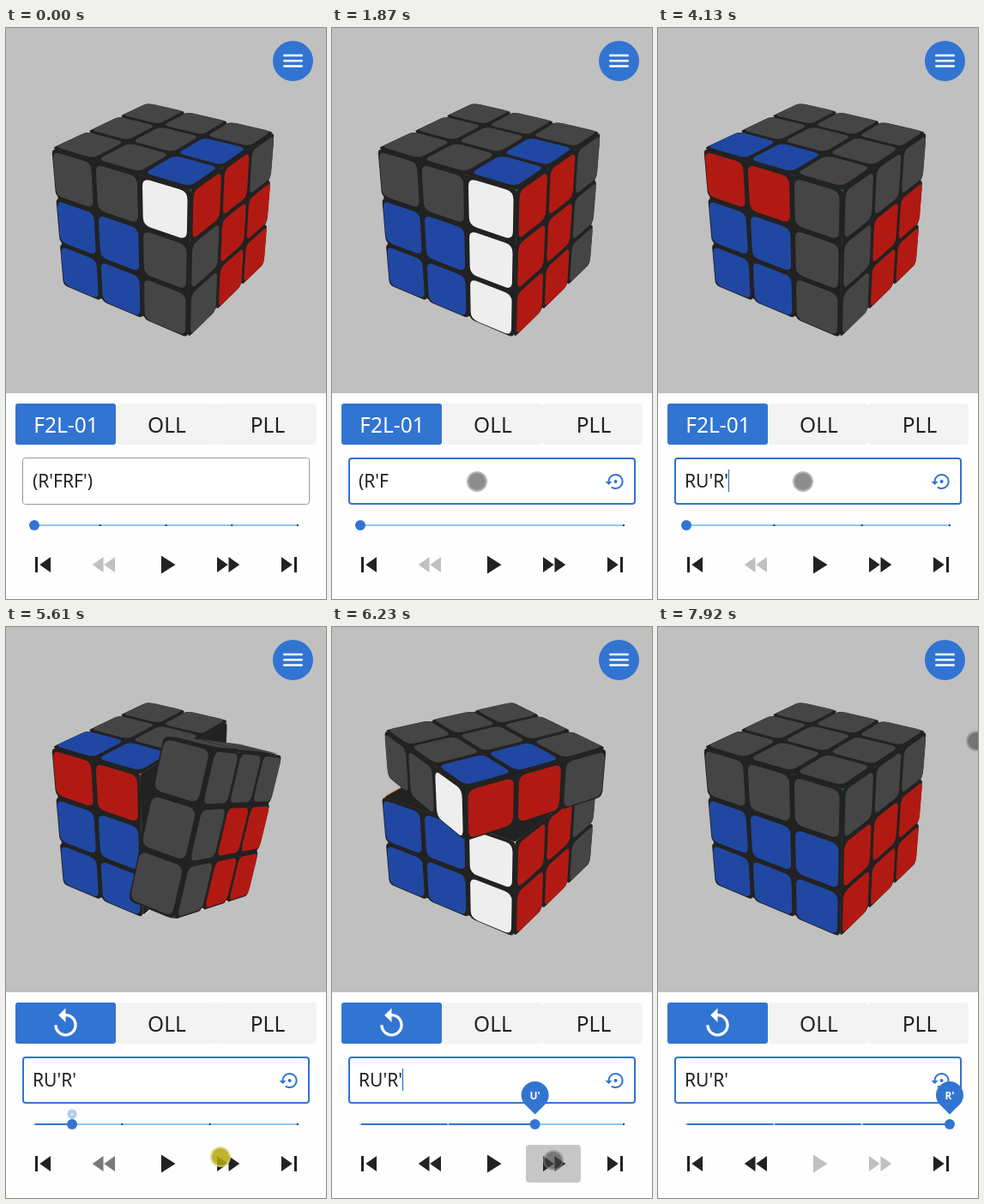
An HTML page with a canvas for the animation above (8 s loop, 373 by 666 pixels).

```html
<!DOCTYPE html>
<html lang="en">
<head>
<meta charset="utf-8">
<title>Cube trainer</title>
<style>
  html, body { margin: 0; width: 100%; height: 100%; overflow: hidden; background: #fff; }
  canvas, svg { position: absolute; left: 0; top: 0; display: block; }
  svg { font-family: "Noto Sans", "Open Sans", sans-serif; }
  .tab { font-size: 24.5px; text-anchor: middle; fill: #222; }
  .blue { fill: #3274d2; }
  .icon { fill: #222; }
</style>
</head>
<body>
<canvas id="view" width="373" height="426"></canvas>
<svg width="373" height="666" viewBox="0 0 373 666">
  <circle class="blue" cx="334.5" cy="38.5" r="23.5"/>
  <path d="M323.3 32h22.4M323.3 38.2h22.4M323.3 44.4h22.4" stroke="#fff" stroke-width="2.5"/>
  <rect y="426" width="373" height="240" fill="#fefefe"/>

  <rect x="11" y="438" width="117" height="48" rx="4" fill="#f3f3f3"/>
  <rect x="128" y="438" width="117" height="48" rx="4" fill="#f3f3f3"/>
  <rect x="245" y="438" width="117" height="48" rx="4" fill="#f3f3f3"/>
  <rect class="blue" x="11" y="438" width="117" height="48" rx="3"/>
  <text id="caseName" class="tab" x="70" y="472" style="fill:#fff;font-weight:500">F2L-01</text>
  <path id="replay" fill="#fff" transform="translate(49.7 442.8) scale(1.65)" d="M12 5V1L7 6l5 5V7c3.31 0 6 2.69 6 6s-2.69 6-6 6-6-2.69-6-6H4c0 4.42 3.58 8 8 8s8-3.58 8-8-3.58-8-8-8z"/>
  <text class="tab" x="187.5" y="472">OLL</text>
  <text class="tab" x="305" y="472">PLL</text>

  <rect id="box" x="19.5" y="501.5" width="334" height="54" rx="3" fill="#fff" stroke="#999"/>
  <text id="entry" x="31" y="536" font-size="21" fill="#222"></text>
  <path id="caret" d="M0 515v26" stroke="#3274d2" stroke-width="1.3"/>
  <path id="restore" class="blue" transform="translate(318.6 517)" d="M14 12c0-1.1-.9-2-2-2s-2 .9-2 2 .9 2 2 2 2-.9 2-2zm-2-9c-4.97 0-9 4.03-9 9H0l4 4 4-4H5c0-3.87 3.13-7 7-7s7 3.13 7 7-3.13 7-7 7c-1.51 0-2.91-.49-4.06-1.3l-1.42 1.44C8.04 20.3 9.94 21 12 21c4.97 0 9-4.03 9-9s-4.03-9-9-9z"/>

  <path d="M33 580H340" stroke="#90c6f5" stroke-width="2"/>
  <path id="filled" stroke="#3274d2" stroke-width="2"/>
  <path id="ticks" stroke="#24405e" stroke-width="2"/>
  <path id="passed" stroke="#b4d2f2" stroke-width="2"/>
  <g id="thumb">
    <circle class="blue" r="6"/>
    <g id="pin">
      <path class="blue" d="M0-11.4L-11.3-22.7A16 16 0 1 1 11.3-22.7Z"/>
      <text id="move" y="-29.5" font-size="12" font-weight="600" fill="#fff" text-anchor="middle"></text>
    </g>
  </g>

  <rect id="press" x="226" y="604" width="64" height="44" rx="4" fill="#c6c6c6"/>
  <g class="icon">
    <path transform="translate(25 608) scale(1.5)" d="M6 6h2v12H6zm3.5 6l8.5 6V6z"/>
    <path id="rewind" transform="translate(97 608) scale(1.5)" d="M11 18V6l-8.5 6 8.5 6zm.5-6l8.5 6V6l-8.5 6z"/>
    <path id="play" transform="translate(169 608) scale(1.5)" d="M8 5v14l11-7z"/>
    <path id="forward" transform="translate(240 608) scale(1.5)" d="M4 18l8.5-6L4 6v12zm9-12v12l8.5-6L13 6z"/>
    <path transform="translate(312 608) scale(1.5)" d="M6 18l8.5-6L6 6v12zM16 6v12h2V6h-2z"/>
  </g>
  <circle id="pointer" r="11" stroke-width="2"/>
</svg>
<script>
const $ = id => document.getElementById(id);
const ctx = $('view').getContext('2d');
const LOOP = 8000;

// [time, text, moves understood so far]
const typing = [
  [0, "(R'FRF')", "R' F R F'"],
  [1330, "(R'FRF'", "R'"], [1480, "(R'FRF", "R'"], [1620, "(R'FR", "R'"],
  [1790, "(R'F", "R'"], [1900, "(R'", "R'"], [1990, "(R", ""], [2080, "(", ""], [2170, "", ""],
  [2490, "R", "R"], [2970, "RU", "R U"], [3370, "RU'", "R U'"],
  [3830, "RU'R", "R U' R"], [4030, "RU'R'", "R U' R'"]
];
const turns = [5543, 6090, 6470];
const TURN_MS = 210, SLIDE_MS = 150, PIN_MS = 170;

const ramp = (t, from, ms) => Math.min(1, Math.max(0, (t - from) / ms));
const smooth = u => u * u * (3 - 2 * u);
const lerp = (a, b, u) => a + (b - a) * u;
const within = (t, a, b) => t >= a && t < b;

// --- cube model: x right, y up, z front ---
const GREY = '#454545', BODY = '#222';
const colours = [['#d2691e', '#b11a12'], ['#eeeeee', GREY], ['#148a3c', '#2047a2']];
const axes = { R: 0, U: 1, F: 2 };

function spin(v, axis, angle) {
  const b = (axis + 1) % 3, c = (axis + 2) % 3, out = [...v];
  const cos = Math.cos(angle), sin = Math.sin(angle);
  out[b] = v[b] * cos - v[c] * sin;
  out[c] = v[b] * sin + v[c] * cos;
  return out;
}

function solved() {
  const list = [];
  for (let axis = 0; axis < 3; axis++)
    for (const sign of [-1, 1])
      for (let i = -1; i < 2; i++)
        for (let j = -1; j < 2; j++) {
          const pos = [0, 0, 0], normal = [0, 0, 0];
          pos[axis] = normal[axis] = sign;
          pos[(axis + 1) % 3] = i;
          pos[(axis + 2) % 3] = j;
          list.push({ pos, normal, colour: pos[1] === 1 ? GREY : colours[axis][(sign + 1) / 2] });
        }
  return list;
}

const angleOf = move => (move[1] === "'" ? 1 : -1) * Math.PI / 2;

function turn(cube, move) {
  const axis = axes[move[0]], angle = angleOf(move);
  const step = v => spin(v, axis, angle).map(Math.round);
  return cube.map(s => s.pos[axis] === 1 ? { ...s, pos: step(s.pos), normal: step(s.normal) } : s);
}

const inverse = moves => [...moves].reverse().map(m => m[1] ? m[0] : m + "'");

// --- camera ---
const az = 34.2 * Math.PI / 180, el = 28.1 * Math.PI / 180;
const DIST = 13.4, FOCAL = 795;
const dot = (a, b) => a[0] * b[0] + a[1] * b[1] + a[2] * b[2];
const right = [Math.cos(az), 0, -Math.sin(az)];
const up = [-Math.sin(az) * Math.sin(el), Math.cos(el), -Math.cos(az) * Math.sin(el)];
const toEye = [Math.sin(az) * Math.cos(el), Math.sin(el), Math.cos(az) * Math.cos(el)];
const eye = toEye.map(v => v * DIST);

function project(p) {
  const k = FOCAL / (DIST - dot(p, toEye));
  return [186.5 + k * dot(p, right), 213 - k * dot(p, up)];
}

// Fills a quad, rounding each corner by the given share of the edge.
function fillQuad(pts, cut, colour) {
  const along = (a, b) => [lerp(a[0], b[0], cut), lerp(a[1], b[1], cut)];
  ctx.beginPath();
  pts.forEach((p, i) => {
    ctx.lineTo(...along(p, pts[(i + 3) % 4]));
    ctx.quadraticCurveTo(...p, ...along(p, pts[(i + 1) % 4]));
  });
  ctx.closePath();
  ctx.fillStyle = colour;
  ctx.fill();
}

// Draws the part of the cube between two planes, turned about their axis.
function drawSlab(cube, axis, from, to, angle) {
  const place = p => spin(p, axis, angle);
  const facing = (normal, p) => {
    const q = place(p);
    return dot(place(normal), eye.map((e, i) => e - q[i])) > 0;
  };
  const quad = (centre, n, h) => {
    const b = (n + 1) % 3, c = (n + 2) % 3;
    return [[-1, -1], [1, -1], [1, 1], [-1, 1]].map(([u, v]) => {
      const p = [...centre];
      p[b] += u * h[b];
      p[c] += v * h[c];
      return project(place(p));
    });
  };
  // A rounded tile over one cubie face, lifted above the cubie's centre.
  const tile = (s, lift, half, cut, colour) => {
    const centre = s.pos.map((v, i) => v + s.normal[i] * lift);
    fillQuad(quad(centre, s.normal.findIndex(v => v), [half, half, half]), cut, colour);
  };
  const sticker = s => tile(s, .515, .447, .17, s.colour);
  const plastic = s => tile(s, .49, .49, .12, BODY);

  const cells = cube.filter(s => s.pos[axis] > from && s.pos[axis] < to);
  const isFront = s => facing(s.normal, s.pos.map((v, i) => v + s.normal[i] * .5));
  const front = cells.filter(isFront);

  cells.filter(s => !isFront(s)).forEach(sticker);
  const mid = [0, 0, 0], half = [1.46, 1.46, 1.46];
  mid[axis] = (from + to) / 2;
  half[axis] = (to - from) / 2 - .03;
  for (let n = 0; n < 3; n++)
    for (const sign of [-1, 1]) {
      const normal = [0, 0, 0], centre = [...mid];
      normal[n] = sign;
      centre[n] += sign * half[n];
      if (facing(normal, centre)) fillQuad(quad(centre, n, half), .02, BODY);
    }
  front.forEach(plastic);
  front.forEach(sticker);
}

function drawCube(t, moves) {
  let cube = inverse(moves).reduce(turn, solved());
  let active = null;
  turns.forEach((start, i) => {
    if (t >= start + TURN_MS) cube = turn(cube, moves[i]);
    else if (t >= start) active = { move: moves[i], u: smooth(ramp(t, start, TURN_MS)) };
  });
  ctx.fillStyle = '#c0c0c0';
  ctx.fillRect(0, 0, 373, 426);
  if (!active) return drawSlab(cube, 0, -1.5, 1.5, 0);
  const axis = axes[active.move[0]];
  drawSlab(cube, axis, -1.5, .5, 0);
  drawSlab(cube, axis, .5, 1.5, angleOf(active.move) * active.u);
}

// --- controls ---
const show = (id, on) => $(id).setAttribute('visibility', on ? 'visible' : 'hidden');
const set = (id, attrs) => { for (const k in attrs) $(id).setAttribute(k, attrs[k]); };

function drawEntry(t, text, lastKey) {
  const focused = t >= 590;
  set('box', focused
    ? { x: 20, y: 502, width: 333, height: 53, stroke: '#3274d2', 'stroke-width': 2 }
    : { x: 19.5, y: 501.5, width: 334, height: 54, stroke: '#999', 'stroke-width': 1 });
  show('restore', focused);
  $('entry').textContent = text;
  const since = t - Math.max(lastKey, 550);
  show('caret', focused && !within(t, 1330, 2340) && since % 1000 < 500);
  set('caret', { transform: `translate(${31.5 + (text ? $('entry').getComputedTextLength() : 0)} 0)` });
}

function drawSlider(t, moves) {
  const count = moves.length || 1;
  const value = turns.reduce((sum, s) => sum + smooth(ramp(t, s, SLIDE_MS)), 0);
  const x = 33 + 307 * value / count;
  const marks = [...Array(count + 1).keys()].map(i => 33 + 307 * i / count);
  const path = list => list.map(m => `M${m - 1} 580h2`).join('');
  set('filled', { d: `M33 580H${x}` });
  set('ticks', { d: path(marks.filter(m => m > x)) });
  set('passed', { d: path(marks.filter(m => m <= x)) });
  set('thumb', { transform: `translate(${x} 580)` });
  const grow = smooth(ramp(t, turns[0], PIN_MS));
  set('pin', { transform: `scale(${grow})`, opacity: grow });
  $('move').textContent = moves[turns.filter(s => t >= s).length - 1] || '';
}

function drawButtons(t) {
  const started = t >= turns[0];
  show('caseName', !started);
  show('replay', started);
  const usable = 1 - ramp(t, 2080, 90) + ramp(t, 2580, 150) - ramp(t, turns[2], 120);
  const shade = u => ({ opacity: .28 + .72 * u });
  set('rewind', shade(ramp(t, turns[0], 150)));
  set('play', shade(usable));
  set('forward', shade(usable));
  show('press', within(t, 5640, 5780) || within(t, 6070, 6330) || within(t, 6440, 6560));
}

function drawPointer(t) {
  const go = smooth(ramp(t, 4840, 600)), settle = ramp(t, 5640, 120);
  let x = lerp(lerp(169, 250, go), 258, settle);
  let y = lerp(lerp(529, 618, go), 622, settle);
  if (t > 7400) {
    x = lerp(386, 371, smooth(ramp(t, 7500, 400)));
    y = 133;
  }
  const tapped = within(t, 5460, 5640);
  set('pointer', {
    cx: x, cy: y,
    fill: tapped ? '#b3a80c' : '#484848',
    stroke: tapped ? '#d8d684' : '#8a8a8a',
    opacity: t < 345 ? .4 : tapped ? .85 : .62
  });
  show('pointer', within(t, 100, 6850) || t > 7400);
}

let begin = null;
function frame() {
  const now = performance.now();
  if (begin === null) begin = now;
  const t = (now - begin) % LOOP;
  const [key, text, alg] = typing.filter(k => k[0] <= t).pop();
  const moves = alg ? alg.split(' ') : [];
  drawCube(t, moves);
  drawEntry(t, text, key);
  drawSlider(t, moves);
  drawButtons(t);
  drawPointer(t);
  requestAnimationFrame(frame);
}
frame();
</script>
</body>
</html>
```
